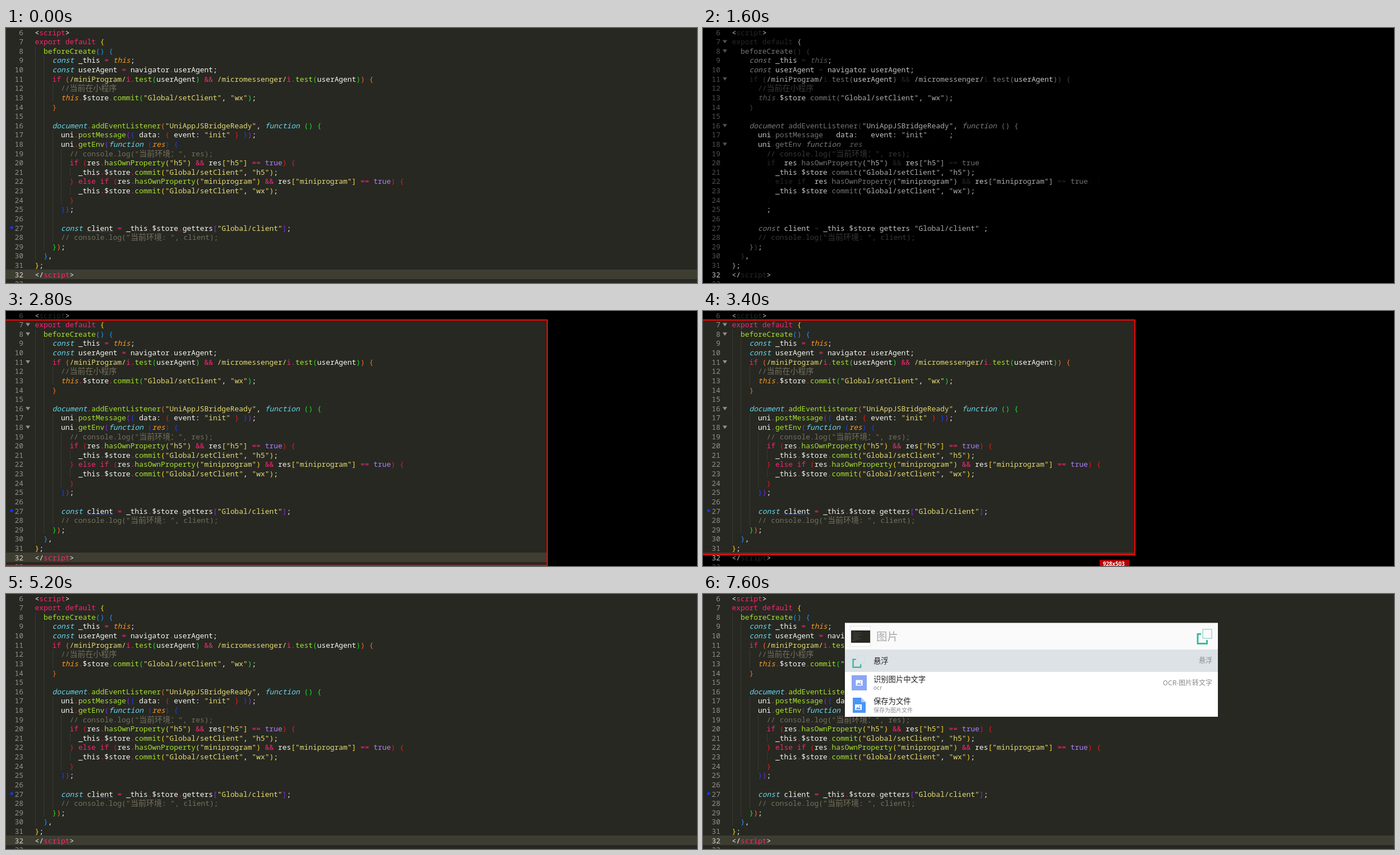
Recreate the animation shown at these times as an HTML page with a canvas. Size 1232 by 455 pixels, loop 8 s.

```html
<!DOCTYPE html>
<html lang="zh">
<head>
<meta charset="utf-8">
<title>Screenshot selection</title>
<style>
html, body { margin: 0; width: 100%; height: 100%; overflow: hidden; background: #272822; }
canvas { display: block; }
</style>
</head>
<body>
<canvas id="stage" width="1232" height="455"></canvas>
<script>
const W = 1232, H = 455, LOOP = 8000;
const MONO = '12.9px "Noto Sans Mono", monospace';
const CJK = '"Noto Sans CJK SC", "Noto Sans CJK JP", "Noto Sans CJK", sans-serif';
const COL = 7.74, LEFT = 51.6, FIRST = 6, ACTIVE = 32;
const RED = '#ff0000', EDGE = 2;

const source = `<script>
export default {
  beforeCreate() {
    const _this = this;
    const userAgent = navigator.userAgent;
    if (/miniProgram/i.test(userAgent) && /micromessenger/i.test(userAgent)) {
      //当前在小程序
      this.$store.commit("Global/setClient", "wx");
    }

    document.addEventListener("UniAppJSBridgeReady", function () {
      uni.postMessage({ data: { event: "init" } });
      uni.getEnv(function (res) {
        // console.log("当前环境：", res);
        if (res.hasOwnProperty("h5") && res["h5"] == true) {
          _this.$store.commit("Global/setClient", "h5");
        } else if (res.hasOwnProperty("miniprogram") && res["miniprogram"] == true) {
          _this.$store.commit("Global/setClient", "wx");
        }
      });

      const client = _this.$store.getters["Global/client"];
      // console.log("当前环境: ", client);
    });
  },
};
<\/script>
`.split('\n');

const fullTheme = {
  bg: '#272822', row: '#3e3d32', num: '#90918b', active: '#d8d8d0', guide: '#4a4b42',
  dot: '#1038ff', line: '#2c3c78', text: '#f8f8f2', string: '#e6db74', comment: '#75715e',
  pink: '#f92672', green: '#a6e22e', cyan: '#66d9ef', orange: '#fd971f', purple: '#ae81ff',
  brackets: ['#ffd820', '#1e90ff', '#f07020', '#20e030', '#8a28e0', '#1840f0', '#e81818']
};
const dimTheme = {
  bg: '#000', row: '#000', num: '#505050', active: '#c0c0c0', guide: '#000',
  dot: '#000', line: '#000', text: '#c4c4c4', string: '#acacac', comment: '#383838',
  pink: '#262626', green: '#767676', cyan: '#7c7c7c', orange: '#5c5c5c', purple: '#707070',
  brackets: ['#a0a0a0', '#303030', '#3c3c3c', '#707070', '#050505', '#030303', '#080808']
};

const rules = [
  ['comment', /\/\/.*/y],
  ['string', /"[^"]*"|\/\w+\//y],
  ['pink', /(?<=\/)i(?=\.)|\b(?:if|else|export|default|script)\b|&&|==?|\./y],
  ['cyan', /\b(?:const|function|document)\b/y, true],
  ['orange', /\bthis\b|(?<=function \()\w+/y, true],
  ['purple', /\btrue\b/y],
  ['green', /\w+(?=\()/y],
  ['bracket', /[()[\]{}]/y],
  ['text', /[$\w]+|\s+|./y]
];

function nextToken(line, at) {
  for (const [kind, re, italic] of rules) {
    re.lastIndex = at;
    const m = re.exec(line);
    if (m) return { kind, italic, text: m[0] };
  }
}

const lineY = n => 8 + (n - FIRST) * 16.615;
const baseline = n => Math.round(lineY(n) + 4.6);

// Draws a run of mixed Latin and Chinese text, returns the x after it.
function drawRun(c, text, x, y, italic) {
  for (const part of text.match(/[\u2e80-\uffff]+|[^\u2e80-\uffff]+/g)) {
    const wide = part.charCodeAt(0) >= 0x2e80;
    c.font = (italic ? 'italic ' : '') + (wide ? '14px ' + CJK : MONO);
    c.fillText(part, x, y);
    x += part.length * (wide ? 14 : COL);
  }
  return x;
}

function drawGuides(c, theme) {
  c.strokeStyle = theme.guide;
  c.setLineDash([1, 1]);
  const guides = [[0, 8, 30], [2, 9, 29], [4, 12, 13], [4, 17, 28], [6, 19, 24], [8, 21, 21], [8, 23, 23]];
  for (const [col, from, to] of guides) {
    const x = Math.round(LEFT + col * COL) + 0.5;
    c.beginPath();
    c.moveTo(x, Math.round(lineY(from) - 8));
    c.lineTo(x, Math.round(lineY(to) + 8));
    c.stroke();
  }
  c.setLineDash([]);
}

function drawFolds(c, theme) {
  c.fillStyle = theme.num;
  for (const n of [7, 8, 11, 16, 18]) {
    const y = lineY(n);
    c.beginPath();
    c.moveTo(35, y - 3);
    c.lineTo(43, y - 3);
    c.lineTo(39, y + 3);
    c.fill();
  }
}

function makeLayer(theme, folds) {
  const layer = document.createElement('canvas');
  layer.width = W;
  layer.height = H;
  const c = layer.getContext('2d');
  c.fillStyle = theme.bg;
  c.fillRect(0, 0, W, H);
  c.fillStyle = theme.row;
  c.fillRect(0, 431, W, 17);
  drawGuides(c, theme);
  c.fillStyle = theme.line;
  c.fillRect(144, 363, 47, 1);
  let depth = 0;
  source.forEach((line, i) => {
    const n = FIRST + i, y = baseline(n);
    c.fillStyle = n === ACTIVE ? theme.active : theme.num;
    drawRun(c, String(n), 31 - String(n).length * COL, y);
    let x = LEFT;
    for (let at = 0; at < line.length;) {
      const { kind, text, italic } = nextToken(line, at);
      if (kind === 'bracket') {
        const open = '([{'.includes(text);
        if (open) depth++;
        c.fillStyle = theme.brackets[(depth - 1) % 7];
        if (!open) depth--;
      } else {
        c.fillStyle = theme[kind];
      }
      x = drawRun(c, text, x, y, italic);
      at += text.length;
    }
  });
  c.fillStyle = theme.dot;
  c.beginPath();
  c.arc(10, 356, 2.6, 0, 7);
  c.fill();
  if (folds) drawFolds(c, theme);
  return layer;
}

const plain = makeLayer(fullTheme, false);
const folded = makeLayer(fullTheme, true);
const dim = makeLayer(dimTheme, true);
const ctx = document.getElementById('stage').getContext('2d');

// Selection corner over time: [ms, right, bottom]
const drag = [
  [1800, 494, 242], [2000, 708, 354], [2200, 896, 424], [2400, 959, 428],
  [2600, 962, 448], [2800, 966, 455], [3000, 842, 440], [3200, 840, 440],
  [3400, 771, 436], [3600, 726, 436], [3800, 712, 434], [4000, 713, 434],
  [4200, 712, 434], [4400, 708, 433], [4600, 707, 433]
];

function rect(color, x, y, w, h) {
  ctx.fillStyle = color;
  ctx.fillRect(x, y, w, h);
}

function reveal(x, y, w, h) {
  ctx.drawImage(folded, x, y, w, h, x, y, w, h);
}

function drawSelection(right, bottom) {
  const top = 15;
  reveal(0, top, right, bottom - top);
  rect(RED, 0, top, right, EDGE);
  rect(RED, 0, bottom - EDGE, right, EDGE);
  rect(RED, right - EDGE, top, EDGE, bottom - top);

  const size = Math.round((right + 2) * 1.2) + 'x' + Math.round((bottom - 16.5) * 1.2);
  ctx.font = 'bold 9.7px "Open Sans", sans-serif';
  const w = Math.round(ctx.measureText(size).width) + 14;
  const x = right - 11 - w;
  rect('#b40000', x, bottom + 8, w, 15);
  ctx.fillStyle = '#fff';
  ctx.fillText(size, x + 6, bottom + 19);
}

function label(text, x, y, size, color, align = 'left', weight = 400) {
  ctx.font = `${weight} ${size}px ${CJK}`;
  ctx.fillStyle = color;
  ctx.textAlign = align;
  ctx.fillText(text, x, y);
  ctx.textAlign = 'left';
}

function shape(color, points) {
  ctx.fillStyle = color;
  ctx.beginPath();
  points.forEach(([x, y]) => ctx.lineTo(x, y));
  ctx.fill();
}

function floatIcon(x, y, s, back) {
  ctx.save();
  ctx.translate(x, y);
  ctx.scale(s, s);
  ctx.lineWidth = 2;
  ctx.strokeStyle = back;
  ctx.strokeRect(11, 1, 16, 16);
  ctx.lineWidth = 3;
  ctx.strokeStyle = '#3fb8a2';
  ctx.beginPath();
  ctx.moveTo(8, 9.5);
  ctx.lineTo(2, 9.5);
  ctx.lineTo(2, 26.5);
  ctx.lineTo(18.5, 26.5);
  ctx.lineTo(18.5, 20);
  ctx.stroke();
  ctx.restore();
}

function pictureIcon(x, y, color) {
  rect('#fff', x, y, 12, 10);
  shape(color, [[x + 1.5, y + 8.5], [x + 4.5, y + 4.5], [x + 6.5, y + 6.5], [x + 8, y + 5], [x + 10.5, y + 8.5]]);
  rect(color, x + 7.5, y + 2, 2, 2);
}

function drawThumb() {
  rect('#e4e4e4', 262, 57, 37, 37);
  rect('#fff', 263, 58, 35, 35);
  rect('#272822', 264, 65, 34, 22);
  for (let i = 0; i < 9; i++) {
    rect('#4c4d42', 266 + (i * 3 % 4), 67 + i * 2, 6 + (i * 7 % 11), 0.7);
  }
}

function drawRows() {
  rect('#fff', 253, 99, 665, 120);
  rect('#dde2e7', 253, 99, 665, 40);

  floatIcon(266, 109, 0.82, '#cbe3e2');
  label('悬浮', 304, 124, 13.3, '#222');
  label('悬浮', 908, 123, 12, '#8a8d90', 'right');

  rect('#8aa6f6', 265, 145, 27, 27);
  pictureIcon(272.5, 153.5, '#8aa6f6');
  label('识别图片中文字', 304, 157, 13.3, '#222');
  label('ocr', 304, 171, 10, '#8a8a8a');
  label('OCR-图片转文字', 908, 163, 12, '#8a8a8a', 'right');

  shape('#4c94f5', [[267, 185], [282, 185], [290, 193], [290, 212], [267, 212]]);
  shape('#a9cdfb', [[282, 185], [290, 193], [282, 193]]);
  pictureIcon(271, 197, '#4c94f5');
  label('保存为文件', 304, 196, 13.3, '#222');
  label('保存为图片文件', 304, 211, 10, '#8a8a8a');
}

function drawPanel(t) {
  rect('#fafafa', 253, 51.5, 665, 48);
  floatIcon(880, 62, 1, '#b5e0d8');
  if (t >= 7200) {
    drawThumb();
    label('图片', 309, 83, 19.5, '#a8a8a8', 'left', 300);
    drawRows();
  }
  if (t < 7600) rect('#333', 309, 63, 1, 25);
}

function draw(t) {
  if (t < 1000 || t >= 5200) {
    ctx.drawImage(t >= 200 && t < 1000 ? folded : plain, 0, 0);
    if (t >= 7000) drawPanel(t);
    return;
  }
  ctx.drawImage(dim, 0, 0);
  if (t < 1600) {
    reveal(0, 0, 56, H);
    rect(RED, 54, 0, EDGE, H);
    return;
  }
  const step = drag.filter(([at]) => at <= t).pop();
  if (step) drawSelection(step[1], step[2]);
}

const start = performance.now();
function tick() {
  draw((performance.now() - start) % LOOP);
  requestAnimationFrame(tick);
}
tick();
</script>
</body>
</html>
```
